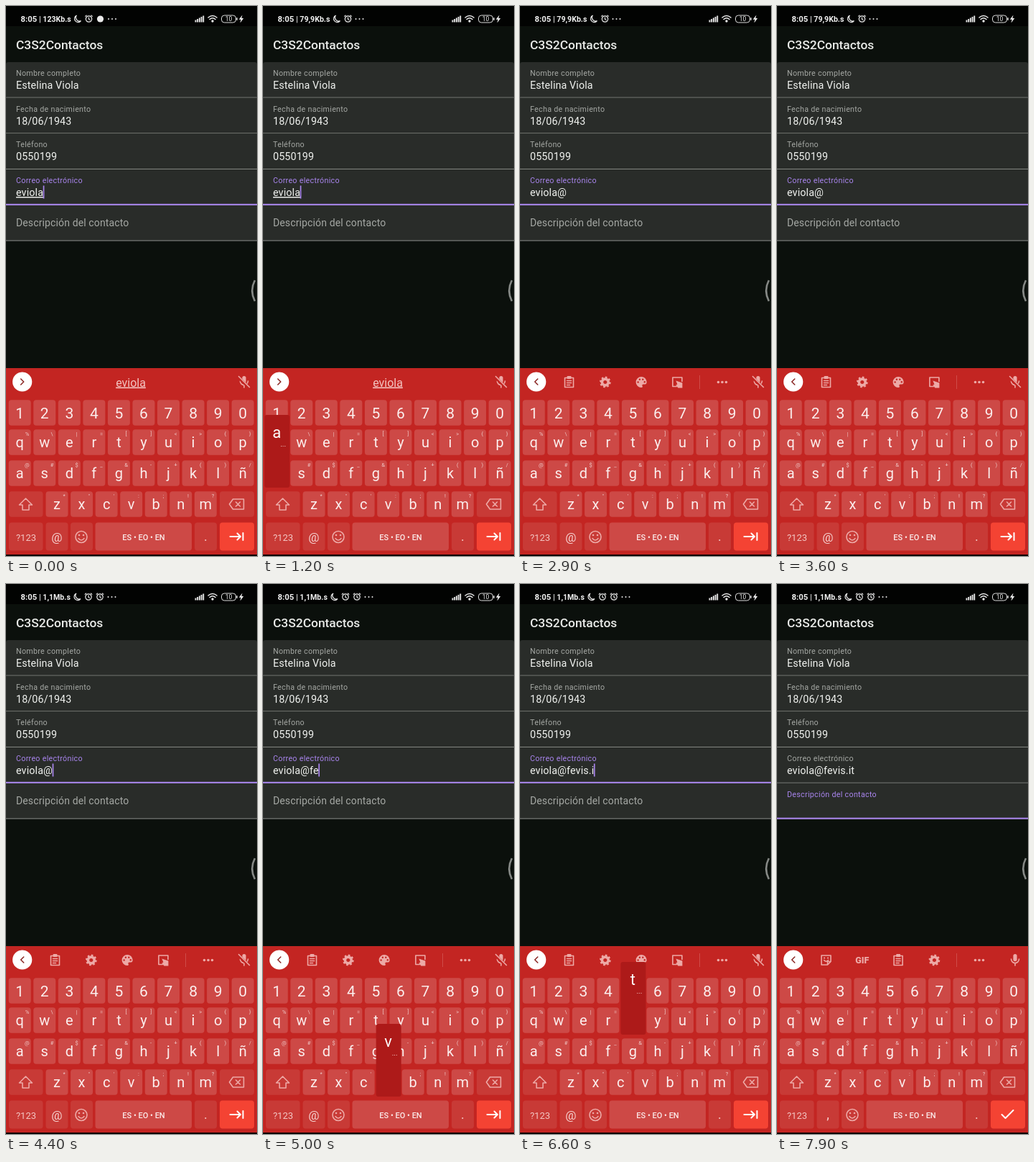
Animation, 350 px wide and 764 px high, one loop 8 s. Source, as an HTML page:

```html
<!DOCTYPE html>
<html lang="es">
<head>
<meta charset="utf-8">
<style>
html, body { margin: 0; width: 100%; height: 100%; overflow: hidden; background: #000; }
svg { display: block; width: 350px; height: 764px; font-family: Roboto, "Noto Sans", sans-serif; }
.mid { text-anchor: middle; }
.value { font-size: 14.3px; letter-spacing: .13px; fill: #f0f2ef; }
.label { font-size: 10.7px; letter-spacing: .3px; }
.line { fill: none; stroke: currentColor; stroke-width: 1.6; stroke-linecap: round; stroke-linejoin: round; }
</style>
</head>
<body>
<svg viewBox="0 0 350 764"><g id="base"></g><g id="live"></g></svg>
<script>
const LOOP = 8000, USER = 'eviola', PURPLE = '#a985ee', GREY = '#a5a8a4', PINK = '#eda9a6';
const RED = '#c32522', KEY = '#cd4946', DIM = '#c83a36', FIELD = '#292c29';
const AT_SIGN = 2000, NEXT = 7300, TOOLS = 7450;
const base = document.getElementById('base'), live = document.getElementById('live');

const esc = s => s.replace(/&/g, '&amp;').replace(/</g, '&lt;');
const rect = (x, y, w, h, fill, r = 0) =>
  `<rect x="${x}" y="${y}" width="${w}" height="${h}" rx="${r}" fill="${fill}"/>`;
const text = (x, y, s, size, fill, extra = '') =>
  `<text x="${x}" y="${y}" font-size="${size}" fill="${fill}" ${extra}>${esc(s)}</text>`;
const mid = (x, y, s, size, fill, weight = 400) =>
  text(x, y, s, size, fill, `class="mid" font-weight="${weight}"`);
const line = (d, extra = '') => `<path class="line" d="${d}" ${extra}/>`;
const dot = (x, y, r, fill = 'currentColor') => `<circle cx="${x}" cy="${y}" r="${r}" fill="${fill}"/>`;
const at = (x, y, inner, color = PINK) => `<g transform="translate(${x} ${y})" color="${color}">${inner}</g>`;

const mic = '<rect x="-2.6" y="-8" width="5.2" height="10" rx="2.6" fill="currentColor"/>' +
  line('M-5.5 -1A5.5 5.5 0 0 0 5.5 -1M0 5V8');
const icons = {
  mic,
  micOff: mic + line('M-8 -6L8 9', `style="stroke:${RED};stroke-width:4"`) + line('M-7.5 -7.5L7.5 7.5'),
  clip: line('M-6 -6H6V7H-6ZM-3 -2H3M-3 1H3M-3 4H1') + '<rect x="-3" y="-8.5" width="6" height="4" rx="1" fill="currentColor"/>',
  gear: '<circle r="4.4" fill="none" stroke="currentColor" stroke-width="3.6"/>' +
    '<circle r="6.6" fill="none" stroke="currentColor" stroke-width="2.6" pathLength="16" stroke-dasharray="1"/>',
  palette: '<path d="M0 -7.5A7.5 7.5 0 1 0 0 7.5C2 7.5 2 6 1.4 5S1.4 3 3 3H5C7 3 7.5 1 7.5 0C7.5 -4.5 4 -7.5 0 -7.5Z" fill="currentColor"/>' +
    [[-4.5, 0], [-2.2, -3.8], [2.2, -3.8], [4.7, -.3]].map(p => dot(...p, 1.2, RED)).join(''),
  resize: line('M-1 6H-6.5V-6.5H6.5V-1') + '<path d="M-2 -2L7 1V8H1L-2 4L0 3Z" fill="currentColor"/>',
  sticker: line('M-6.5 -6.5H6.5V2L2 6.5H-6.5ZM6.5 2H2V6.5M-3 0Q0 3.5 3 0') + dot(-2.5, -3, 1.1) + dot(2.5, -3, 1.1),
  gif: mid(0, 4.5, 'GIF', 12.5, PINK, 900),
  more: dot(-5.5, 0, 1.8) + dot(0, 0, 1.8) + dot(5.5, 0, 1.8),
  moon: '<path d="M-1 -5A5 5 0 1 0 5 2.6A5 5 0 0 1 -1 -5Z" fill="none" stroke="currentColor" stroke-width="1.2"/>',
  alarm: '<g fill="none" stroke="currentColor" stroke-width="1.2"><circle r="4.2"/><path d="M0 -2.4V.4L2 1.6M-5.2 -3.4L-3 -5.2M5.2 -3.4L3 -5.2"/></g>',
  chat: dot(0, 0, 4.6),
  dots: dot(-5, 0, 1) + dot(0, 0, 1) + dot(5, 0, 1)
};

// Keyboard layout: letters paired with their corner hints
const colX = i => 19.2 + i * 34.55;
const rows = [
  ['1234567890', '', 565, 0],
  ['qwertyuiop', '%\\|=[]<>{}', 606, 0],
  ['asdfghjklñ', '@#$_&-+()/', 649, 0],
  ['zxcvbnm', '*"\':;!?', 692, 1.5]
];
const keyPos = { '.': [278.3, 738] };

function drawKeyboard() {
  let s = rect(0, 503, 350, 259, RED);
  rows.forEach(([letters, hints, y, shift]) => [...letters].forEach((c, i) => {
    const x = colX(i + shift);
    keyPos[c] = [x, y];
    s += rect(x - 15.5, y - 17.7, 31, 35.5, KEY, 4) + mid(x, y + (hints ? 6.5 : 7.5), c, hints ? 20 : 21, '#fbeeed');
    if (hints) s += mid(x + 10.2, y - 9, hints[i], 7.5, '#f0c9c7');
  }));
  [[4, 47.5], [298, 48]].forEach(([x, w]) => s += rect(x, 674.3, w, 35.5, DIM, 4));
  [[4, 47.5], [55.5, 31], [90, 31], [263, 31]].forEach(([x, w]) => s += rect(x, 717.5, w, 39, DIM, 4));
  s += rect(124.5, 717.5, 134.5, 39, KEY, 4) + rect(298, 717.5, 48, 39, '#f44333', 4);
  s += at(27.5, 692, line('M0 -8L9 1H4.5V8H-4.5V1H-9Z'));
  s += at(321.5, 692, line('M-10 0L-5 -7H10V7H-5ZM-1 -3L5 3M5 -3L-1 3'));
  s += mid(28, 742.5, '?123', 13, '#f3c7c4') + mid(192, 742, 'ES • EO • EN', 11, '#fbe9e8', 500);
  s += at(105, 737.5, line('M-4 2Q0 7 4 2') + '<circle class="line" r="8"/>' + dot(-3, -2.5, 1.3) + dot(3, -2.5, 1.3));
  return s + mid(278.3, 743, '.', 18, '#f3c7c4');
}

const fieldY = i => i * 49.7;
function drawBase() {
  let s = rect(0, 0, 350, 764, '#0b100c') + rect(0, 0, 350, 28, '#020302') + rect(0, 762, 350, 2, '#050505');
  s += text(14, 60, 'C3S2Contactos', 17.4, '#e9ebe8', 'font-weight="500"');
  for (let i = 0; i < 5; i++) s += rect(0, 78 + fieldY(i), 350, 49.7, FIELD, i ? 0 : 3) + rect(0, 126.6 + fieldY(i), 350, 1, '#858884');
  [['Nombre completo', 'Estelina Viola'], ['Fecha de nacimiento', '18/06/1943'], ['Teléfono', '0550199']].forEach(([label, value], i) => {
    s += `<text class="label" x="14" y="${97 + fieldY(i)}" fill="${GREY}">${label}</text>`;
    s += `<text class="value" x="14" y="${115 + fieldY(i)}">${value}</text>`;
  });
  s += '<path d="M347 381Q339.5 395.5 347 410" fill="none" stroke="#858885" stroke-width="2.6"/>';
  // Right side of the status bar
  [3, 4.5, 6, 7.5, 9].forEach((h, i) => s += rect(263.5 + i * 2.7, 22.5 - h, 1.9, h, '#e8e8e8'));
  s += at(288, 22, line('M-6 -6Q0 -11 6 -6M-4 -3.5Q0 -7 4 -3.5') + dot(0, -1, 1.7), '#e8e8e8');
  s += '<rect x="300.5" y="13" width="20" height="10" rx="4" fill="none" stroke="#dedede"/>' + rect(321.3, 16, 1.5, 4, '#dedede', 1);
  s += mid(310.5, 21.2, '10', 8.5, '#e8e8e8') + '<path d="M329.5 12.5L324.8 18.8H327.6L326.5 23.5L331.3 17H328.4Z" fill="#eee"/>';
  return s + drawKeyboard();
}

// Each tap: character, time it is entered, hold before, linger after
const taps = [['f', 4600], ['e', 4850], ['v', 5100], ['i', 5320], ['s', 5550], ['.', 6050], ['i', 6400], ['t', 6650]];
const presses = [['a', AT_SIGN, 900, 0], ...taps.map(([c, t]) => [c, t, 100, 80])];

function drawStatus(t) {
  const [rate, list, x] = t < 600 ? ['123Kb.s', ['moon', 'alarm', 'chat', 'dots'], 99.5]
    : t < 3900 ? ['79,9Kb.s', ['moon', 'alarm', 'dots'], 102.5]
    : ['1,1Mb.s', ['moon', 'alarm', 'alarm', 'dots'], 99];
  return text(20.5, 22, '8:05', 11.3, '#f2f2f2', 'font-weight="700"') +
    text(46, 22, '| ' + rate, 10.6, '#f2f2f2', 'font-weight="700"') +
    list.map((name, i) => at(x + i * 16 + (name == 'dots' && i == 3 ? .5 : 0), 18, icons[name], '#eaeaea')).join('');
}

function drawBar(t) {
  const typing = t < AT_SIGN, next = t >= TOOLS;
  let s = dot(22.7, 522, 13.6, '#fff') + at(22.7, 522, line(typing ? 'M-2 -4L2 0L-2 4' : 'M2 -4L-2 0L2 4'), '#8d2b28');
  s += at(332, 522, icons[next ? 'mic' : 'micOff']);
  if (typing) return s + text(174, 528.5, USER, 16, '#f3c3c0', 'class="mid" text-decoration="underline"');
  const list = next ? ['sticker', 'gif', 'clip', 'gear'] : ['clip', 'gear', 'palette', 'resize'];
  list.forEach((name, i) => s += at(68.5 + i * 50.3, 522.5, icons[name]));
  return s + rect(250, 513, 1, 19, '#cf4c49') + at(282, 522.5, icons.more);
}

function drawForm(t) {
  const onMail = t < NEXT;
  const typed = taps.filter(tap => t >= tap[1]);
  const since = !onMail ? NEXT : typed.length ? typed[typed.length - 1][1] : t < AT_SIGN ? 0 : AT_SIGN;
  const mail = USER + (t < AT_SIGN ? '' : '@') + typed.map(tap => tap[0]).join('');
  const p = Math.min(1, Math.max(0, (t - NEXT) / 167)), k = p * p * (3 - 2 * p);
  const mix = (a, b) => (a + (b - a) * k).toFixed(2);
  let s = `<text class="label" x="14" y="246.1" fill="${onMail ? PURPLE : GREY}">Correo electrónico</text>`;
  s += `<text id="mail" class="value" x="14" y="264" ${t < AT_SIGN ? 'text-decoration="underline"' : ''}>${mail}</text>`;
  s += text(14, mix(306, 295.8), 'Descripción del contacto', mix(14, 10.7), onMail ? GREY : PURPLE, `letter-spacing="${mix(.13, .3)}"`);
  s += rect(0, onMail ? 274.8 : 324.6, 350, 2, PURPLE);
  if (Math.floor((t - since) / 500) % 2 == 0) s += `<rect id="caret" x="14" y="${onMail ? 249.5 : 299}" width="1.7" height="18" fill="${PURPLE}"/>`;
  return s;
}

function drawPress(t) {
  const hit = presses.find(([, enter, hold, linger]) => t >= enter - hold && t < enter + linger);
  if (!hit) return '';
  const [x, y] = keyPos[hit[0]];
  return rect(x - 17, y - 81, 35, 101, '#ad1a19', 3) + mid(x, y - 49, hit[0], 22, '#fff') + mid(x + 9, y - 37, '...', 10, '#f3d0ce');
}

function drawKeys(t) {
  const next = t >= TOOLS;
  return mid(71, next ? 743 : 743.5, next ? ',' : '@', next ? 18 : 17, '#f6d2d0') +
    at(321.5, 737, line(next ? 'M-8 0L-3 5L8 -6' : 'M-9 0H5M1 -4.5L5.5 0L1 4.5M9 -5V5', 'style="stroke-width:2"'), '#fff');
}

let shown = '';
function frame() {
  const t = performance.now() % LOOP;
  const markup = drawStatus(t) + drawForm(t) + drawBar(t) + drawKeys(t) + drawPress(t);
  if (markup != shown) {
    live.innerHTML = shown = markup;
    const caret = document.getElementById('caret');
    if (caret && t < NEXT) caret.setAttribute('x', 13.6 + document.getElementById('mail').getComputedTextLength());
  }
  requestAnimationFrame(frame);
}
base.innerHTML = drawBase();
frame();
</script>
</body>
</html>
```
